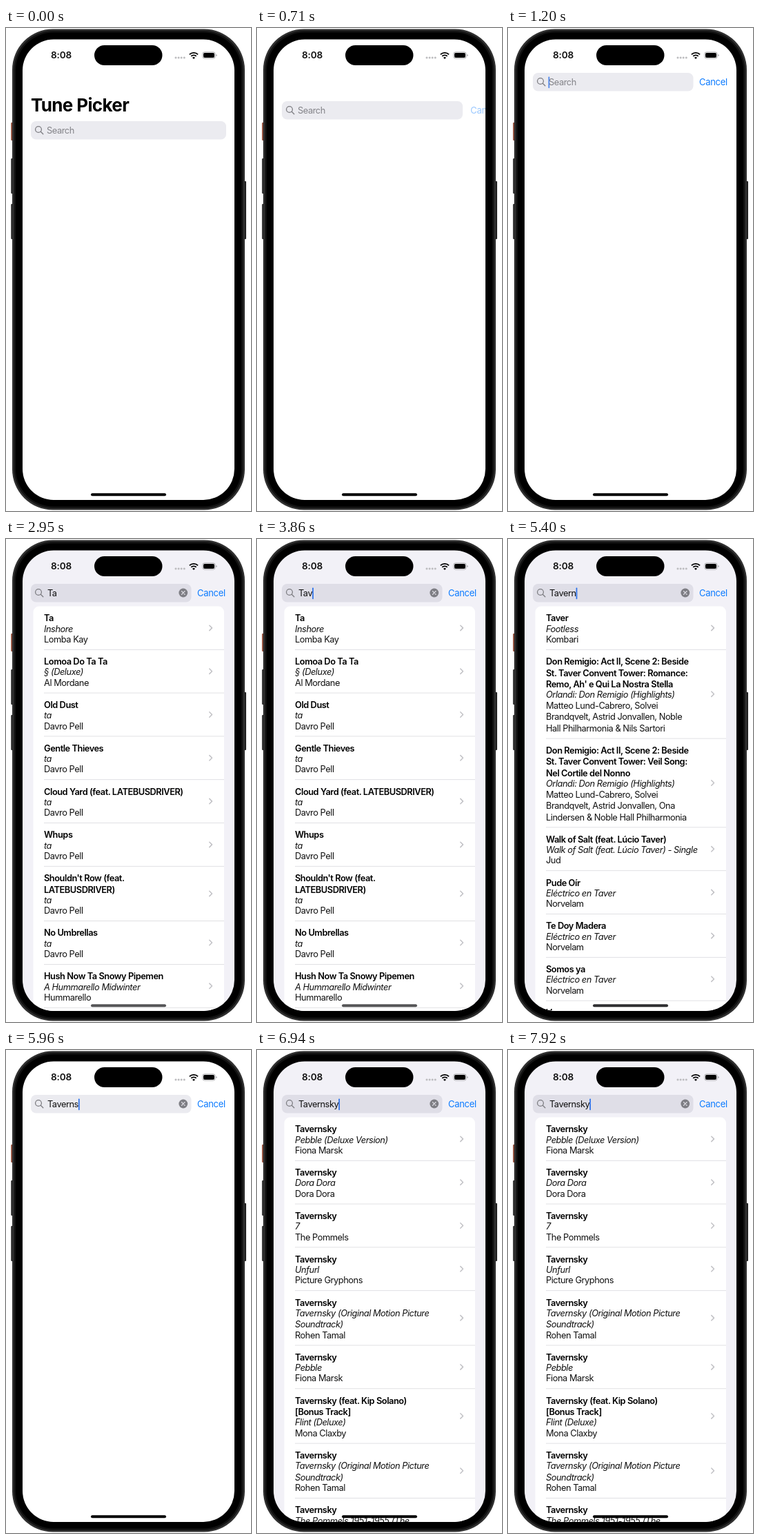
An HTML page that plays this animation: 355 by 700 pixels, repeating every 8 s.

```html
<!DOCTYPE html>
<html lang="en">
<head>
<meta charset="utf-8">
<title>Music search on a phone</title>
<style>
  html, body { margin: 0; width: 100%; height: 100%; overflow: hidden; background: #fff; }
  svg { display: block; width: 100%; height: 100%; }
  text { font: 400 12.8px Inter, "Liberation Sans", sans-serif; letter-spacing: -.45px; white-space: pre; fill: #111; }
  .song { font-weight: 600; fill: #000; }
  .album { font-style: italic; }
  .heading { font-size: 26px; font-weight: 700; letter-spacing: -.65px; fill: #000; }
  .clock { font-size: 13.6px; font-weight: 600; letter-spacing: -.2px; }
  .hint { fill: #838388; }
  .cancel { font-size: 13px; letter-spacing: -.3px; fill: #0a7aff; }
</style>
</head>
<body>
<svg viewBox="0 0 355 700">
  <defs>
    <clipPath id="screen"><rect x="24" y="16.5" width="307" height="667.5" rx="45"/></clipPath>
  </defs>

  <!-- phone body -->
  <g fill="#222">
    <rect x="7.3" y="137" width="4" height="26" rx="1" fill="#8a402c"/>
    <rect x="7.3" y="189" width="4" height="51" rx="1"/>
    <rect x="7.3" y="255" width="4" height="51" rx="1"/>
    <rect x="344" y="222" width="4" height="84" rx="1"/>
  </g>
  <rect x="9" y="1.5" width="337" height="697" rx="59" fill="#303030"/>
  <rect x="11.5" y="4" width="332" height="692" rx="57" fill="#121212"/>
  <rect x="14" y="6.5" width="327" height="687" rx="55"/>

  <g clip-path="url(#screen)">
    <rect id="page" x="24" y="16" width="307" height="669"/>
    <g id="lists"></g>
    <text id="heading" class="heading" x="36" y="121">Tune Picker</text>

    <g id="search">
      <rect id="field" x="36" y="65" height="26.5" rx="7.5"/>
      <g fill="none" stroke="#7d7d82" stroke-width="1.3" stroke-linecap="round">
        <circle cx="47" cy="77" r="4.4"/>
        <path d="M50.3 80.3l3.5 3.5"/>
      </g>
      <rect id="mark" x="58" y="70.5" height="17" fill="#b0d0f6"/>
      <text id="hint" class="hint" x="59" y="83">Search</text>
      <text id="query" x="60" y="83"></text>
      <rect id="caret" y="70.5" width="1.7" height="16.8" rx=".8" fill="#2a70ea"/>
      <g id="clear">
        <circle cx="256.8" cy="78" r="6.4" fill="#7e7e84"/>
        <path d="M254.5 75.7l4.6 4.6m0-4.6l-4.6 4.6" stroke="#e6e5ec" stroke-width="1.2" stroke-linecap="round"/>
      </g>
      <text id="cancel" class="cancel" y="82.5">Cancel</text>
    </g>

    <!-- status bar -->
    <text class="clock" x="65" y="44.3">8:08</text>
    <rect x="128" y="25" width="98.5" height="29" rx="14.5"/>
    <g fill="#bdbdc0">
      <circle cx="246" cy="43" r="1.5"/><circle cx="250.1" cy="43" r="1.5"/>
      <circle cx="254.2" cy="43" r="1.5"/><circle cx="258.3" cy="43" r="1.5"/>
    </g>
    <g fill="none" stroke="#000" stroke-width="1.9">
      <path d="M265.9 38.4a8.6 8.6 0 0 1 12.2 0"/>
      <path d="M268.3 40.9a5.2 5.2 0 0 1 7.4 0"/>
    </g>
    <path d="M272 45l-2-2.1a2.9 2.9 0 0 1 4 0z"/>
    <rect x="284.8" y="34.8" width="18.4" height="9.4" rx="3" fill="none" stroke="#a5a5a8" stroke-width=".9"/>
    <rect x="286" y="36" width="16" height="7" rx="1.9"/>
    <path d="M304.4 38v3q1.4-.5 1.4-1.5t-1.4-1.5z" fill="#a5a5a8"/>

    <rect id="home" x="123" y="674.3" width="109" height="4" rx="2"/>
  </g>
</svg>

<script>
const LOOP = 8000;
const $ = id => document.getElementById(id);

// song | album | artist, with ~ as a line break
const RESULTS = {
  two: [
    "Ta|Inshore|Lomba Kay",
    "Lomoa Do Ta Ta|§ (Deluxe)|Al Mordane",
    "Old Dust|ta|Davro Pell",
    "Gentle Thieves|ta|Davro Pell",
    "Cloud Yard (feat. LATEBUSDRIVER)|ta|Davro Pell",
    "Whups|ta|Davro Pell",
    "Shouldn't Row (feat.~LATEBUSDRIVER)|ta|Davro Pell",
    "No Umbrellas|ta|Davro Pell",
    "Hush Now Ta Snowy Pipemen|A Hummarello Midwinter|Hummarello",
    "||"
  ],
  four: [
    "Tave|Drum Salt 2013|TVQ",
    "Hugh Plimm's Parachute Tave,~February 1958|Sown and Salted|Evan Torlow",
    "Pom Pom Pom Pom|Fox Borrowed Her Coat|Flat Tire Marquis",
    "Show Us Where to Tavel|Show Us Where to Tavel - Single|Hey Lad Baron",
    "We're Quite Dry|That Was No Tavern!|Tilly Ormonde",
    "Tave|Tave - Single|Bristo Kelune",
    "Tave|Las Olmas|Las Olmas",
    "Horn Outro/Fold That Linen|That Was No Tavern!|Tilly Ormonde",
    "Tave|Urnelo|Talumbi",
    "||"
  ],
  five: [
    "Taver|Footless|Kombari",
    "Don Remigio: Act II, Scene 2: Beside~St. Taver Convent Tower: Romance:~Remo, Ah' e Qui La Nostra Stella|Orlandi: Don Remigio (Highlights)|Matteo Lund-Cabrero, Solvei~Brandqvelt, Astrid Jonvallen, Noble~Hall Philharmonia & Nils Sartori",
    "Don Remigio: Act II, Scene 2: Beside~St. Taver Convent Tower: Veil Song:~Nel Cortile del Nonno|Orlandi: Don Remigio (Highlights)|Matteo Lund-Cabrero, Solvei~Brandqvelt, Astrid Jonvallen, Ona~Lindersen & Noble Hall Philharmonia",
    "Walk of Salt (feat. Lúcio Taver)|Walk of Salt (feat. Lúcio Taver) - Single|Jud",
    "Pude Oír|Eléctrico en Taver|Norvelam",
    "Te Doy Madera|Eléctrico en Taver|Norvelam",
    "Somos ya|Eléctrico en Taver|Norvelam",
    "Ven|Eléctrico en Taver|Norvelam"
  ],
  full: [
    "Tavernsky|Pebble (Deluxe Version)|Fiona Marsk",
    "Tavernsky|Dora Dora|Dora Dora",
    "Tavernsky|7|The Pommels",
    "Tavernsky|Unfurl|Picture Gryphons",
    "Tavernsky|Tavernsky (Original Motion Picture~Soundtrack)|Rohen Tamal",
    "Tavernsky|Pebble|Fiona Marsk",
    "Tavernsky (feat. Kip Solano)~[Bonus Track]|Flint (Deluxe)|Mona Claxby",
    "Tavernsky|Tavernsky (Original Motion Picture~Soundtrack)|Rohen Tamal",
    "Tavernsky|The Pommels 1951-1955 (The~Complete Years)|The Pommels"
  ]
};

// Timelines: [start time, value]
const LETTERS = [[0, 0], [1830, 1], [1970, 2], [3720, 3], [4070, 4], [4420, 5],
                 [5400, 6], [5960, 7], [6100, 8], [6170, 9]];
const SHOWN = [[0, ""], [2320, "two"], [4420, "four"], [5400, "five"], [5960, ""], [6520, "full"]];
const HOME = [[0, "#000"], [2320, "#555557"], [5400, "#303032"], [5960, "#000"]];
// Caret fades: [start, end, opacity reached]
const FADES = [[1000, 1060, 1], [1170, 1340, 0], [1600, 1690, 1], [2780, 2950, 0], [3190, 3300, 1],
               [5020, 5190, 0], [5390, 5400, 1], [6940, 7150, 0], [7320, 7500, 1]];

const clamp = v => Math.max(0, Math.min(1, v));
const mix = (a, b, p) => a + (b - a) * p;
const at = (line, t) => line.reduce((v, [start, next]) => t >= start ? next : v, line[0][1]);
const show = (el, on) => el.setAttribute("visibility", on ? "visible" : "hidden");
const set = (id, attrs) => { for (const k in attrs) $(id).setAttribute(k, attrs[k]); };
const caretAlpha = t => FADES.reduce((v, [a, b, to]) => mix(v, to, clamp((t - a) / (b - a))), 0);

function add(parent, tag, attrs, content = "") {
  const el = document.createElementNS("http://www.w3.org/2000/svg", tag);
  for (const k in attrs) el.setAttribute(k, attrs[k]);
  el.textContent = content;
  return parent.appendChild(el);
}

function buildList(rows) {
  const list = add($("lists"), "g", {});
  add(list, "rect", { x: 39.5, y: 97.5, width: 276.5, height: 640, rx: 8.5, fill: "#fff" });
  let top = 97.5;
  for (const row of rows) {
    const parts = row.split("|").map(p => p.split("~"));
    let y = top + 21.8;
    parts.forEach((lines, i) => {
      lines.forEach((line, n) => {
        if (n) y += 16.5;
        add(list, "text", { x: 55, y, class: ["song", "album", "artist"][i] }, line);
      });
      y += 15.3;
    });
    const height = 62.8 + 16.5 * (parts.flat().length - 3);
    add(list, "path", {
      d: `M294.8 ${top + height / 2 - 3.7}l3.7 3.7l-3.7 3.7`,
      fill: "none", stroke: "#c2c2c6", "stroke-width": 1.5, "stroke-linecap": "round", "stroke-linejoin": "round"
    });
    top += height;
    add(list, "rect", { x: 55, y: top - .4, width: 261, height: .8, fill: "#d9d9dd" });
  }
  return list;
}

const lists = Object.entries(RESULTS).map(([key, rows]) => [key, buildList(rows)]);

function draw(t) {
  // search field rises and narrows to make room for Cancel
  const p = t < 500 ? 0 : clamp((t - 450) / 590);
  const rise = p * p * (3 - 2 * p);
  const width = mix(283, 232.5, rise);
  set("search", { transform: `translate(0 ${mix(70, 0, rise)})` });
  set("heading", { opacity: clamp(1 - p * 3.2), transform: `translate(0 ${-70 * rise})` });
  set("cancel", { x: mix(332, 277, rise), opacity: rise });

  const shown = at(SHOWN, t);
  lists.forEach(([key, el]) => show(el, key === shown));
  set("page", { fill: shown ? "#f2f1f7" : "#fff" });
  set("field", { width, fill: shown ? "#dfdee7" : "#ebebf0" });
  set("home", { fill: at(HOME, t) });

  const typed = "Tavernsky".slice(0, at(LETTERS, t));
  $("query").textContent = typed;
  const end = typed ? 60 + $("query").getComputedTextLength() : 58.5;
  show($("hint"), !typed);
  show($("clear"), typed);
  show($("mark"), t >= 4280 && t < 4560);
  set("mark", { width: Math.max(0, end - 57) });
  set("caret", { x: end, opacity: caretAlpha(t) });
}

const begin = performance.now();
function tick() {
  draw((performance.now() - begin) % LOOP);
  requestAnimationFrame(tick);
}
tick();
</script>
</body>
</html>
```
